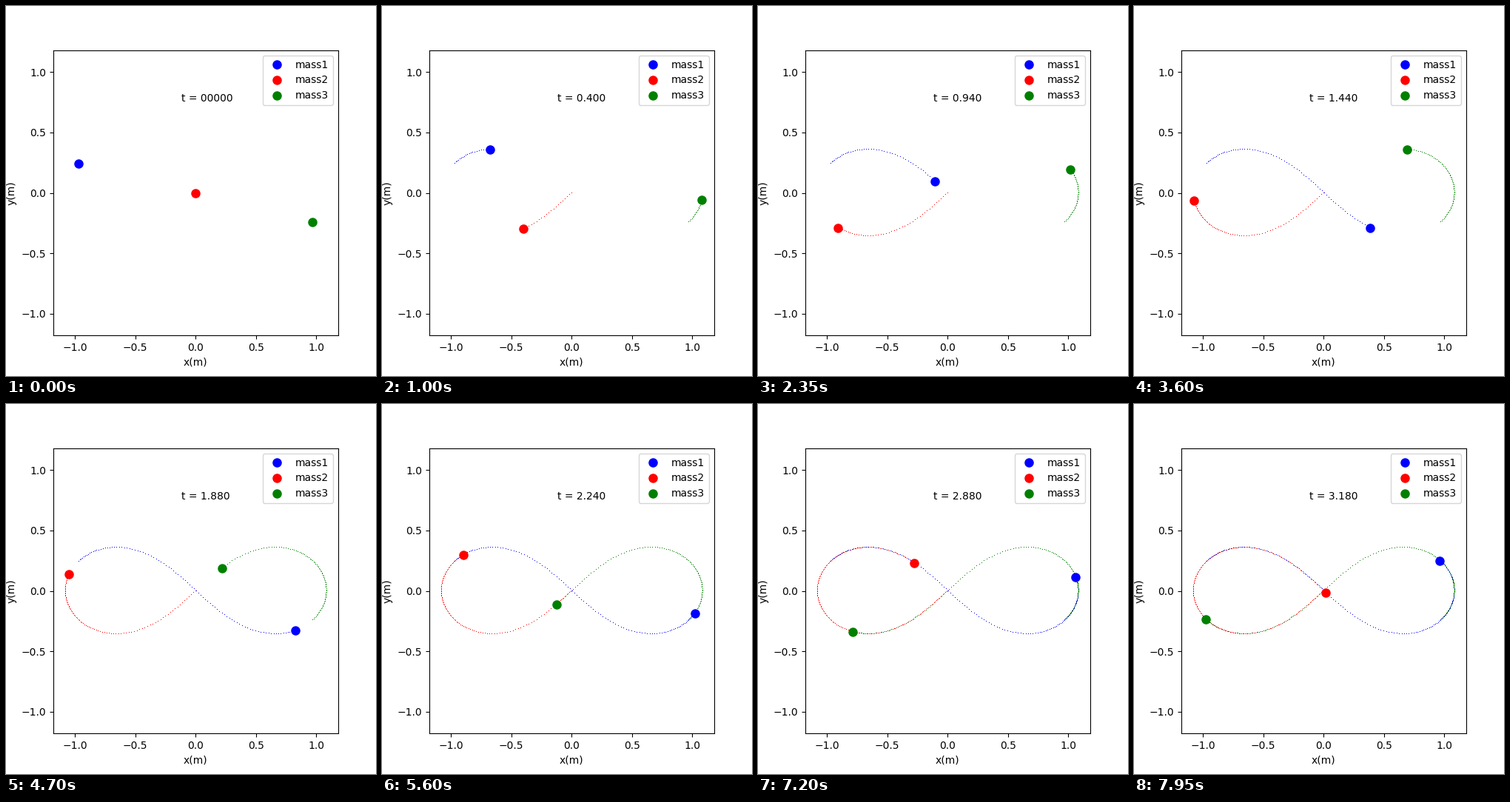
Write a matplotlib script that moves like this. It is 500x500 px and loops after 8 s.

```python
import numpy as np
import matplotlib.pyplot as plt
from matplotlib.animation import FuncAnimation

FRAMES, INTERVAL, DT, SUBSTEPS = 160, 50, 0.02, 10
COLORS = ["blue", "red", "green"]
LIMIT = 1.18


def accel(pos):
    """Gravity between three unit masses, with G = 1."""
    gap = pos[None] - pos[:, None]
    dist = np.sqrt((gap ** 2).sum(-1)) + np.eye(3)
    return (gap / dist[..., None] ** 3).sum(1)


def deriv(state):
    return np.array([state[1], accel(state[0])])


def rk4(state, h):
    a = deriv(state)
    b = deriv(state + a * h / 2)
    c = deriv(state + b * h / 2)
    d = deriv(state + c * h)
    return state + (a + 2 * b + 2 * c + d) * h / 6


def orbit():
    """Figure-eight solution: positions shaped (frame, body, xy)."""
    p = np.array([-0.97000436, 0.24308753])
    v = np.array([-0.93240737, -0.86473146])
    state = np.array([[p, 0 * p, -p], [-v / 2, v, -v / 2]])
    track = []
    for _ in range(FRAMES):
        track.append(state[0])
        for _ in range(SUBSTEPS):
            state = rk4(state, DT / SUBSTEPS)
    return np.array(track)


track = orbit()
fig, ax = plt.subplots(figsize=(5, 5), dpi=100)
ax.set_aspect("equal")
ax.set(xlim=(-LIMIT, LIMIT), ylim=(-LIMIT, LIMIT), xlabel="x(m)", ylabel="y(m)")
ticks = np.linspace(-1, 1, 5)
ax.set_xticks(ticks)
ax.set_yticks(ticks)

trails = [ax.plot([], [], ",", color=c)[0] for c in COLORS]
masses = [ax.plot([], [], "o", color=c, ms=8, label=f"mass{k}")[0]
          for k, c in enumerate(COLORS, 1)]
clock = ax.text(0.45, 0.82, "", transform=ax.transAxes)
ax.legend(loc="upper right")


def draw(i):
    for k in range(3):
        trails[k].set_data(track[:i + 1, k, 0], track[:i + 1, k, 1])
        masses[k].set_data(track[i:i + 1, k, 0], track[i:i + 1, k, 1])
    clock.set_text(f"t = {i * DT:.3f}" if i else "t = 00000")
    return trails + masses + [clock]


anim = FuncAnimation(fig, draw, frames=FRAMES, interval=INTERVAL,
                     init_func=lambda: draw(0), repeat=True, repeat_delay=0)
plt.show()
```
